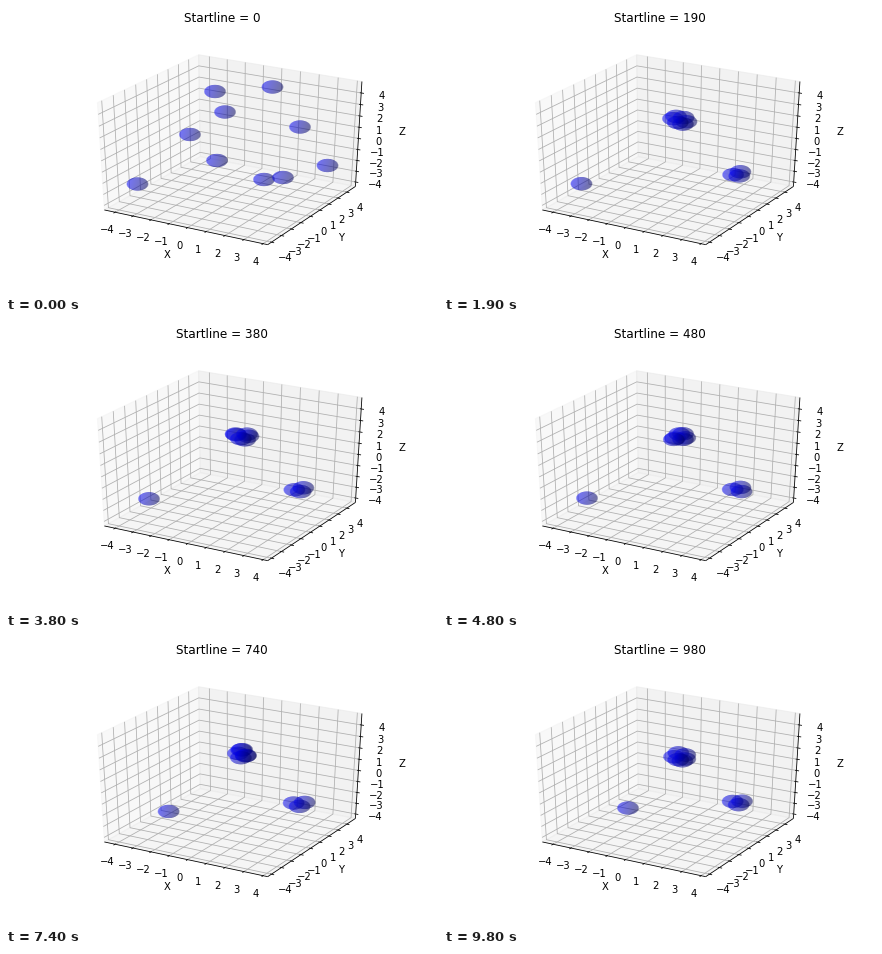
A matplotlib script that plays this animation: 432 by 288 pixels, repeating every 9.9 s.

```python
import numpy as np
import matplotlib.pyplot as plt
from matplotlib.animation import FuncAnimation

W, H = 432, 288
FRAMES, INTERVAL = 99, 100

plt.rcParams["font.family"] = "DejaVu Sans"
fig = plt.figure(figsize=(W / 72, H / 72), dpi=72, facecolor="white")
ax = fig.add_axes([0, 0, 1, 1])
ax.axis("off")

# --- Perspective box: unit cube seen from elevation 30, azimuth -60 ---
RIGHT = np.array([np.sqrt(3) / 2, 0.5, 0])
UP = np.array([-0.25, np.sqrt(3) / 4, np.sqrt(3) / 2])
TOWARD = np.array([np.sqrt(3) / 4, -0.75, 0.5])
EDGE = 25 / 48          # half size of the drawn box
STEP = 1 / 12           # unit for tick and label offsets
LIMITS = [(-4.43, 4.06), (-4.18, 4.80), (-4.23, 4.79)]


def project(point):
    """Box coordinates to stage pixels, y pointing down."""
    point = np.asarray(point, float)
    depth = 10 - point @ TOWARD
    return (225.92 + 1809.7 * (point @ RIGHT) / depth,
            140.34 - 1175.4 * (point @ UP) / depth)


def path(points, **style):
    ax.plot(*project(points), lw=0.8, solid_capstyle="butt", **style)


def on_axis(index, value, others):
    """A point with `value` on one axis and `others` on the remaining two."""
    return np.insert(np.array(others, float), index, value)


def draw_pane(index, side, grey):
    ring = [(-1, -1), (-1, 1), (1, 1), (1, -1)]
    corners = [on_axis(index, side * EDGE, np.array(c) * EDGE) for c in ring]
    ax.fill(*project(corners), fc=(grey,) * 3, ec=(grey,) * 3, alpha=0.5, lw=1)


def draw_axis(index, name, signs, tick_dir, grid_corners):
    """Axis line, grid, ticks and labels along one edge of the box."""
    signs = np.array(signs)
    path([on_axis(index, s * EDGE, signs * EDGE) for s in (-1, 1)], color="k")
    lo, hi = LIMITS[index]
    values = np.arange(-4, 5)
    spots = (values - (lo + hi) / 2) / (hi - lo)
    for spot in spots:
        path([on_axis(index, spot, np.array(c) * EDGE) for c in grid_corners],
             color="#b0b0b0")
    for value, spot in zip(values, spots):
        ends = []
        for offset in (-0.1, 0.2):
            end = on_axis(index, spot, signs * EDGE)
            end[tick_dir] += np.sign(end[tick_dir]) * offset * STEP
            ends.append(end)
        path(ends, color="k")
        x, y = project(on_axis(index, spot, signs * (EDGE + STEP)))
        ax.text(x, y, str(value).replace("-", "\u2212"), size=10,
                ha="center", va="top")
    x, y = project(on_axis(index, 0, signs * (EDGE + 2.173 * STEP)))
    ax.text(x, y, name, size=10, ha="center", va="center")


draw_pane(0, -1, 0.95)
draw_pane(1, 1, 0.90)
draw_pane(2, -1, 0.925)
draw_axis(0, "X", (-1, -1), 1, [(-1, -1), (1, -1), (1, 1)])
draw_axis(1, "Y", (1, -1), 0, [(1, -1), (-1, -1), (-1, 1)])
draw_axis(2, "Z", (1, 1), 0, [(-1, -1), (-1, 1), (1, 1)])

title = fig.text(0.5, 0.98, "", size=12, ha="center", va="top")


class Cluster:
    """Balls that gather around a hub, then jostle there."""

    def __init__(self, starts, hub, spread, drift, seed):
        self.starts = np.array(starts, float)
        self.hub, self.spread, self.drift = np.array(hub), np.array(spread), drift
        count = len(starts)
        rng = np.random.default_rng(seed)
        self.slots = np.pi + 2 * np.pi * np.arange(count) / count
        self.phase = rng.uniform(0, 2 * np.pi, count)
        self.rate = rng.uniform(0.2, 0.5, count)

    def at(self, step):
        sway = np.sin(self.rate * step + self.phase)
        angle = self.slots + 0.5 * sway
        reach = 1 + 0.3 * np.sin(0.31 * step + 2 * self.phase)
        ring = np.stack([np.cos(angle), np.sin(angle)], axis=1)
        goal = self.hub + ring * reach[:, None] * self.spread
        goal[:, 1] += self.drift * (step / FRAMES) ** 3
        s = min(step / 20, 1)
        return self.starts + s * s * (3 - 2 * s) * (goal - self.starts)


# Starting points run clockwise from the left of each hub.
clusters = [
    Cluster([(184, 128.5), (209, 85.5), (219, 106),
             (266.5, 81), (294, 121), (211, 154.5)],
            hub=(236, 114), spread=(6, 3.6), drift=5.5, seed=3),
    Cluster([(258, 173.5), (321.5, 159.5), (277, 171.5)],
            hub=(293.5, 167.7), spread=(5, 2.6), drift=-3, seed=5),
]


def loner(step):
    x = np.interp(step, [0, 5, 10, 24, 52, 98], [131.5, 124, 127.5, 143, 143, 184])
    return [(x, 178 - 8 * (step / 98) ** 2)]


def positions(step):
    return np.vstack([c.at(step) for c in clusters] + [loner(step)])


RX, RY = 10.7, 6.7
LIGHT = (-0.911, 0.167, 0.378)
LAYER_ALPHA = 0.315


def render(spots):
    """Blend the shaded back and front halves of every ball into one layer."""
    blue, cover = np.zeros((H, W)), np.zeros((H, W))
    for cx, cy in spots:
        x0, y0 = int(cx) - 13, int(cy) - 9
        box = np.s_[y0:y0 + 19, x0:x0 + 27]
        py, px = np.mgrid[box]
        nx, ny = (px + 0.5 - cx) / RX, (cy - py - 0.5) / RY
        radius = np.hypot(nx, ny)
        nz = np.sqrt(np.clip(1 - radius ** 2, 0, 1))
        alpha = LAYER_ALPHA * np.clip((1 - radius) * 8 + 0.5, 0, 1)
        for side in (-1, 1):
            lit = LIGHT[0] * nx + LIGHT[1] * ny + side * LIGHT[2] * nz
            shade = np.clip(0.3 + 0.35 * (lit + 1), 0.3, 1)
            blue[box] = shade * alpha + blue[box] * (1 - alpha)
            cover[box] = alpha + cover[box] * (1 - alpha)
    layer = np.zeros((H, W, 4))
    layer[..., 2] = blue / np.maximum(cover, 1e-6)
    layer[..., 3] = cover
    return np.clip(layer, 0, 1)


balls = ax.imshow(render(positions(0)), extent=(0, W, H, 0), aspect="auto",
                  interpolation="nearest", zorder=5)
ax.set_xlim(0, W)
ax.set_ylim(H, 0)


def update(step):
    title.set_text(f"Startline = {10 * step}")
    balls.set_data(render(positions(step)))
    return title, balls


anim = FuncAnimation(fig, update, frames=FRAMES, interval=INTERVAL, repeat=True)
plt.show()
```
